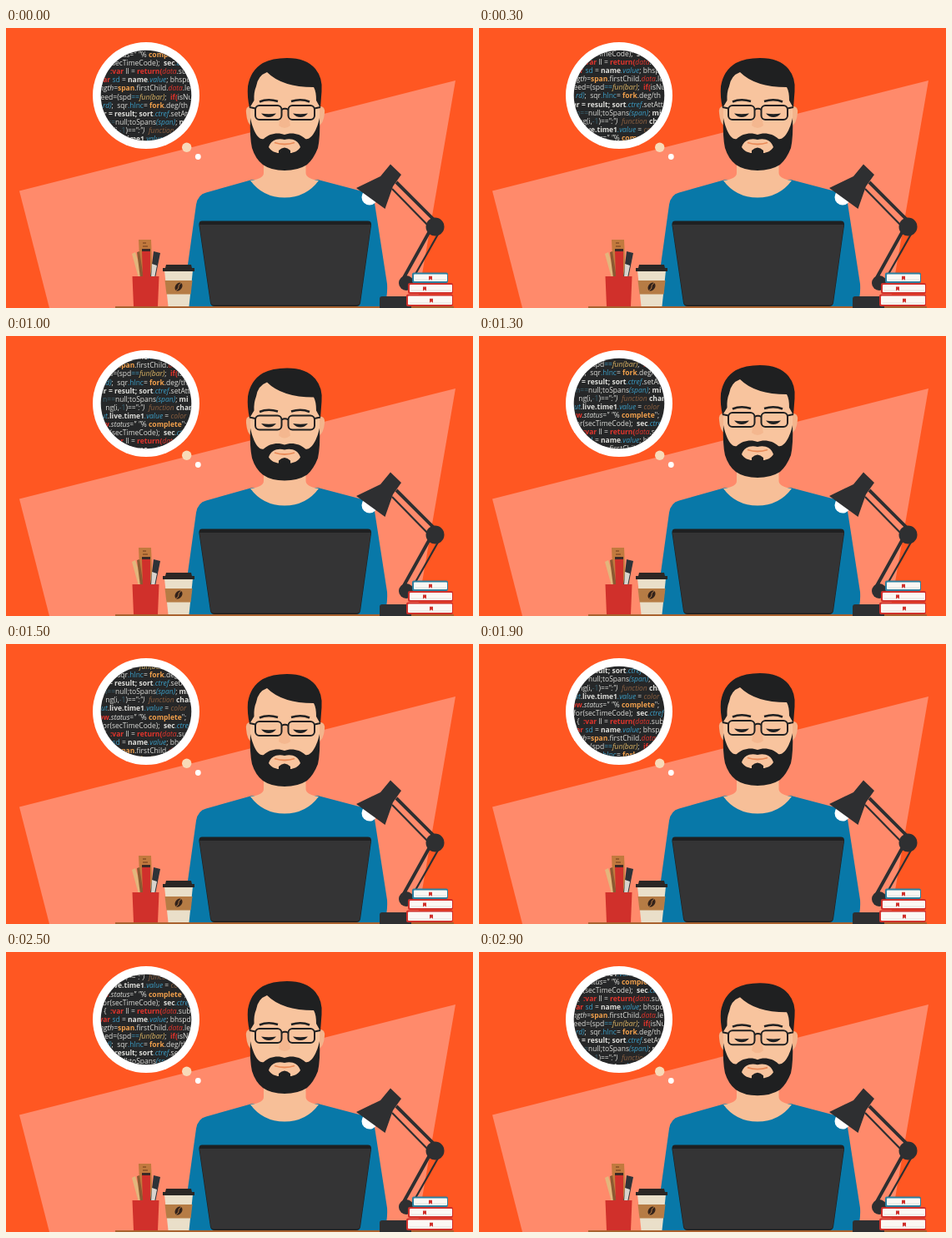
An HTML page that plays this animation: 560x336 px, repeating every 3 s.

```html
<!DOCTYPE html>
<html lang="en">
<head>
<meta charset="utf-8">
<title>Thinking in code</title>
<style>
  html, body { margin: 0; width: 100%; height: 100%; overflow: hidden; background: #ff5722; }
  svg { display: block; width: 560px; height: 336px; }
  text { font: 8.5px "Open Sans", "Noto Sans", sans-serif; fill: #dededa; white-space: pre; }
  .b, .r, .o { font-weight: 700; }
  .i, .R, .U, .O, .d { font-style: italic; }
  .r, .R { fill: #e0342c; }
  .u, .U { fill: #3b9cc4; }
  .o { fill: #f2a04c; }
  .O { fill: #dcb565; }
  .d { fill: #8d6040; }
  .k { fill: #3d6675; }
</style>
</head>
<body>
<svg viewBox="0 0 560 336" xmlns="http://www.w3.org/2000/svg">
  <defs>
    <clipPath id="lens"><circle cx="168" cy="81" r="54"/></clipPath>
  </defs>
  <rect width="560" height="336" fill="#ff5722"/>
  <path d="M16 195.500L539 63L492 336H52Z" fill="#ff8a6b"/>

  <!-- thought bubble -->
  <circle cx="168" cy="81" r="64" fill="#fff"/>
  <circle cx="168" cy="81" r="54.300" fill="#262728"/>
  <g clip-path="url(#lens)"><g id="code"></g></g>
  <circle cx="216.700" cy="143.300" r="5.700" fill="#f8dab8"/>
  <circle cx="230.300" cy="154.500" r="3.400" fill="#fff"/>

  <!-- body -->
  <path d="M219 336Q213 330 214 313L228 212Q230 200 240 197.500L295 182H374L431 197Q440 200 442 210L457 307Q458 322 453 336Z" fill="#0878a8"/>
  <path d="M309 150H359.500V174Q360 181 375 183Q360 203.500 334 203.500Q308 203.500 293 183Q309 181 309 174Z" fill="#f7bf98"/>

  <rect x="131" y="334" width="406" height="2" fill="#a9622f"/>

  <!-- head -->
  <g id="head">
    <path d="M294 94Q287 93 288 102Q289 115 295 118ZM375 94Q383 93 382 102Q381 115 374 118Z" fill="#f3b48c"/>
    <path d="M293 75Q300 46 334 46Q370 46 376 75V122Q374 165 335 168Q295 165 293 122Z" fill="#f8c49e"/>
    <path d="M292 96Q289 82 290 70Q293 51 308 42Q319 36 337 36Q360 36 371 49Q380 60 378.500 76L377 96L372 87Q372 76 369 71Q331 71 313 53Q302 57 300 70Q297 77 297.500 87Z" fill="#1f2021"/>
    <path d="M331.500 95H336.500L341 117Q334 123 327 117Z" fill="#f4b78f"/>
    <path d="M293 108C296 122 302 135 309 133C316 126 327 125 334 128C341 125 352 126 359 133C366 135 373 122 376 108Q377 130 374 144Q369 157 361 164Q350 171 334 171Q318 171 308 164Q299 157 295 144Q292 130 293 108Z" fill="#1f2021"/>
    <path d="M315 143C318 134 326 132 334 134C342 132 350 134 353 143C350 148 344 150 341 150V147Q334 140 327 147V150C324 150 318 148 315 143Z" fill="#f8c49e"/>
    <path d="M322 137.500Q334 141.500 346 137.500" fill="none" stroke="#e98a58" stroke-width="1.800"/>
    <path d="M304 88.500Q314 84.500 326 88M342 88Q354 84.500 364 88.500" fill="none" stroke="#1f2021" stroke-width="2.500"/>
    <path d="M306 102.500Q315 104 324 102.500Q320 107 315 107Q310 107 306 102.500ZM344 102.500Q353 104 362 102.500Q358 107 353 107Q348 107 344 102.500Z" fill="#1f2021"/>
    <g fill="none" stroke="#1f2021" stroke-width="2">
      <rect x="299" y="93" width="31.500" height="17" rx="5"/>
      <rect x="338.500" y="93" width="31.500" height="17" rx="5"/>
      <path d="M330.500 98Q334.500 95.500 338.500 98M299 96.500L292 95M370 96.500L377 95"/>
    </g>
  </g>

  <!-- laptop -->
  <path d="M235 231.500H434Q438.500 231.500 438 237L425 330Q424 334 420 334H250Q246 334 245 330L231.500 237Q231 231.500 235 231.500Z" fill="#1f2021"/>
  <path d="M232 236H437.500L424.500 329Q424 332.500 420 332.500H250Q246 332.500 245.500 329Z" fill="#343435"/>

  <!-- pens and pot -->
  <path d="M159 254H174L176 300H161Z" fill="#c27a3e"/>
  <path d="M164 258h4M164 262h6" stroke="#6e3a1a"/>
  <path d="M151 271L155 269L165 300H159Z" fill="#e3b67c"/>
  <path d="M157 269L160 268L165 300H161Z" fill="#8a5a32"/>
  <path d="M163 267H173V300H164Z" fill="#d0302b"/>
  <path d="M163 265H173V268H163Z" fill="#3b2a26"/>
  <path d="M177 268L185 270L179 300H173Z" fill="#2e3338"/>
  <path d="M175 283L181 285L178 300H174Z" fill="#d9d4cc"/>
  <path d="M151.500 298H183.500L182 334H153Z" fill="#d0302b"/>

  <!-- coffee -->
  <path d="M190 291H224L219.500 334H194.500Z" fill="#eadfc9"/>
  <path d="M190.500 303H223.500L221.500 319.500H192.500Z" fill="#b67c45"/>
  <path d="M192 284H222L223 288H226V292H188V288H191Z" fill="#2b2725"/>
  <g transform="rotate(35 207 310.500)">
    <ellipse cx="207" cy="310.500" rx="4" ry="5.500" fill="#33221a"/>
    <path d="M207 305.500Q205 308.500 207 310.500T207 315.500" fill="none" stroke="#b67c45" stroke-width=".9"/>
  </g>

  <!-- lamp -->
  <circle cx="436" cy="203" r="9.500" fill="#fff"/>
  <g stroke="#2e2f31" fill="none">
    <path d="M468 185L516 233M509 242L474 305" stroke-width="4"/>
    <path d="M463 193L508 239M520 244L486 304" stroke-width="2.200"/>
  </g>
  <g fill="#2e2f31">
    <path d="M420 192L449 178L461 163.500L474 176L464 190L454.500 217Z"/>
    <circle cx="514.500" cy="238.500" r="11"/>
    <circle cx="480" cy="306" r="9"/>
    <path d="M448 336V325Q448 322 451 322H486V336Z"/>
  </g>

  <g id="books"></g>
</svg>
<script>
const LOOP = 3000, STEP = 100, GAP = 10.1;
const BOB = [0, -1, -1, 0, 2.5, 1.2];

// [x, styled parts ending at x, styled parts starting at x]
const LINES = [
  [171, 'r:window|i:.status=" "|w:% ', 'o:complete|w:";'],
  [189, 'w:for(secTimeCode);  ', 'b:sec|U:.ctref'],
  [157, 'w:{  |r::var|w: ll = ', 'r:return(|R:data|w:.sub'],
  [146, 'r:var |u:sd |w:= ', 'b:name|U:.value|w:; bhspd'],
  [134, 'i:length|w:=', 'o:span|w:.firstChild.|R:data|w:.le'],
  [197, 'i:sp|w:eed=(spd|u:==|O:fun(bar)|w:;  ', 'r:if(|w:isNum'],
  [172, 'U:rd)|w:;  sqr|u:.hlnc|w:= ', 'o:fork|w:.deg/th'],
  [130, 'b:ar = ', 'b:result; sort|U:.ctref|w:.setAtt'],
  [131, 'k:n==', 'w:null;toSpans|U:(span)|w:; |b:mi'],
  [204, 'w:ng(i,|k:-1|w:)|i:==":")  |d:function ', 'b:chang'],
  [124, 'U:ut|w:.', 'b:live.time1|U:.value|w: = |d:color']
];

const $ = id => document.getElementById(id);
const spans = s => s.split('|').map(p => `<tspan class="${p[0]}">${p.slice(2)}</tspan>`).join('');

let rows = '';
for (let k = -1; k <= 2 * LINES.length; k++) {
  const [x, pre, post] = LINES[(k + LINES.length) % LINES.length];
  const y = 35 + k * GAP;
  rows += `<text x="${x}" y="${y}" text-anchor="end">${spans(pre)}</text><text x="${x}" y="${y}">${spans(post)}</text>`;
}
$('code').innerHTML = rows;

const book = (x, y, w, h, cover, mark) => `
  <rect x="${x}" y="${y}" width="${w}" height="${h}" rx="2" fill="${cover}"/>
  <rect x="${x + 2}" y="${y + 2}" width="${w - 3}" height="${h - 4}" rx="1" fill="#fbf8f4"/>
  <path d="M${x + 4} ${y + h - 4}H${x + w - 2}" stroke="#dedbd6" stroke-width=".8"/>
  <path d="M${mark} ${y + h / 2 - 2}h4v5l-2-1.500l-2 1.500z" fill="#d0302b"/>`;
$('books').innerHTML =
  book(487, 293.500, 43, 12.500, '#2c7f9e', 507) +
  book(482, 306, 54, 13, '#d0302b', 500) +
  book(480, 319.500, 56, 14.500, '#d0302b', 508);

function draw(ms) {
  const n = Math.floor((ms % LOOP) / STEP);
  const shift = n * STEP / LOOP * GAP * LINES.length;
  $('code').setAttribute('transform', `translate(0 ${-shift})`);
  $('head').setAttribute('transform', `translate(0 ${BOB[n % BOB.length]})`);
}

let start;
function tick(now) {
  start ??= now;
  draw(now - start);
  requestAnimationFrame(tick);
}
draw(0);
requestAnimationFrame(tick);
</script>
</body>
</html>
```
